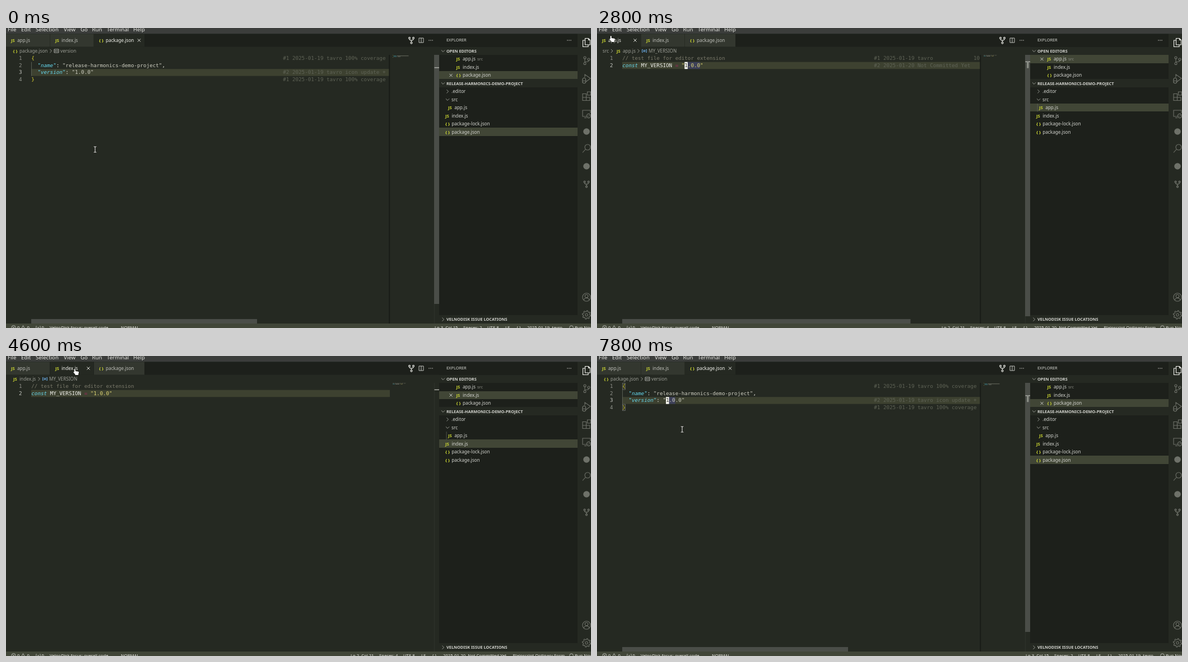
Write an HTML page with a canvas that moves like this. It is 1044 px wide and 536 px high and loops after 8000 ms.

```html
<!DOCTYPE html>
<html lang="en">
<head>
<meta charset="utf-8">
<title>Editor session</title>
<style>
html, body { margin: 0; width: 100%; height: 100%; overflow: hidden; background: #252922; }
canvas { display: block; width: 1044px; height: 536px; }
</style>
</head>
<body>
<canvas id="stage"></canvas>
<script>
const W = 1044, H = 536, LOOP = 8000, STEP = 100;
const canvas = document.getElementById('stage');
const ctx = canvas.getContext('2d');
const dpr = window.devicePixelRatio || 1;
canvas.width = W * dpr;
canvas.height = H * dpr;

const SANS = '"Noto Sans", "Open Sans", sans-serif';
const MONO = '"DejaVu Sans Mono", monospace';
const UI = `8.2px ${SANS}`, SMALL = `7.4px ${SANS}`, HEAD = `bold 7.35px ${SANS}`;
const MENU = `9.6px ${SANS}`, STATUS = `7.7px ${SANS}`, BADGE = `bold 7.6px ${SANS}`;
const CODE = `9.22px ${MONO}`, SLANT = `italic 9.22px ${MONO}`;
const CHAR = 5.55, LEFT = 45.3, TOP = 48.2, LINE = 12.5;

const C = {
  editor: '#252922', side: '#1d201b', tab: '#33372f', row: '#414636', line: '#3d4130',
  text: '#d2d3ce', dim: '#9b9d95', icon: '#6e7169', lime: '#cbd632', white: '#f4f4ef',
  cyan: '#66d9ef', str: '#cfcfc2', gold: '#e0d774', brace: '#e3d92f', note: '#5f6356'
};
const PROJECT = 'release-harmonics-demo-project';
const USER = 'tavro';

// ---------- helpers ----------
function rect(x, y, w, h, color) {
  ctx.fillStyle = color;
  ctx.fillRect(x, y, w, h);
}
function text(str, x, y, color = C.text, font = UI, align = 'left') {
  ctx.font = font;
  ctx.fillStyle = color;
  ctx.textAlign = align;
  ctx.fillText(str, x, y);
}
// Labels are placed by their vertical middle.
const label = (str, x, mid, color, font) => text(str, x, mid + 2.9, color, font);

function icon(d, x, y, color = C.text, width = 0.9) {
  ctx.save();
  ctx.translate(x, y);
  ctx.strokeStyle = color;
  ctx.lineWidth = width;
  ctx.stroke(new Path2D(d));
  ctx.restore();
}
function dot(x, y, r, color) {
  ctx.fillStyle = color;
  ctx.beginPath();
  ctx.arc(x, y, r, 0, 7);
  ctx.fill();
}
const more = (x, y) => [-3, 0, 3].forEach(d => dot(x + d, y, 0.75, C.text));
const close = (x, y, color) => icon('M-2.6-2.6L2.6 2.6M2.6-2.6L-2.6 2.6', x, y, color, 0.9);
const right = (x, y) => icon('M-1.6-3.1L1.5 0L-1.6 3.1', x, y, '#b4b6ae', 0.8);
const down = (x, y) => icon('M-3.1-1.5L0 1.6L3.1-1.5', x, y, '#b4b6ae', 0.8);
const badge = (type, x, mid) => text(type === 'js' ? 'JS' : '{ }', x, mid + 2.7, C.lime, BADGE);
const ring = (r, x = 0, y = 0) => `M${x + r} ${y}A${r} ${r} 0 1 1 ${x - r} ${y}A${r} ${r} 0 1 1 ${x + r} ${y}`;
const FORK = ring(1.5, -3.5, -4) + ring(1.5, 3.5, -4) + ring(1.5, 0, 4.5) +
  'M-3.5-2.5Q-3.5 0 0 0Q3.5 0 3.5-2.5M0 0V3';
const SOURCE = ring(2, -3, -5) + ring(2, 4, -2) + ring(2, -3, 5.5) + 'M-3-3V3.5M4 0Q4 2.2 1.5 2.2H0Q-3 2.2-3 3.5';

function gear(r, teeth) {
  let d = '';
  for (let i = 0; i < teeth * 4; i++) {
    const a = (i + 0.5) * Math.PI / (teeth * 2), k = i % 4 < 2 ? r : r * 0.74;
    d += `${i ? 'L' : 'M'}${k * Math.cos(a)} ${k * Math.sin(a)}`;
  }
  return d + 'Z' + ring(r * 0.3);
}

// ---------- timeline ----------
const mouse = [
  [0, 159, 217], [400, 159, 217], [900, 132, 104], [1000, 132, 104], [1300, 102, 54],
  [1400, 107, 60], [1500, 107, 60], [1900, 24, 21], [2000, 24, 21], [2200, 27, 19],
  [3100, 27, 19], [3700, 41, 23], [4000, 44, 24], [4300, 125, 28], [4900, 125, 28],
  [5600, 189, 23], [5900, 189, 23], [6200, 158, 106], [6800, 152, 131], [8000, 152, 131]
];
const caretOn = [[2100, 3200], [3600, 4000], [4800, 5200], [5500, 6400], [6800, 7400], [7800, 8000]];
const clamp = v => Math.max(0, Math.min(1, v));
const within = (t, a, b) => t >= a && t < b;

function mouseAt(t) {
  const i = mouse.findIndex((k, n) => n && t <= k[0]);
  const [t0, x0, y0] = mouse[i - 1], [t1, x1, y1] = mouse[i];
  const p = (t - t0) / (t1 - t0), e = p * p * (3 - 2 * p);
  return [x0 + (x1 - x0) * e, y0 + (y1 - y0) * e];
}
function stateAt(t) {
  const file = t < 2400 ? 'pkg' : t < 4500 ? 'app' : t < 5800 ? 'index' : 'pkg';
  const noted = t < 2400 || within(t, 2800, 4500) || within(t, 5000, 5800) || t >= 6000;
  const fade = start => 1 - clamp((t - start) / 800);
  return {
    file, noted,
    wide: noted && !within(t, 6000, 6300),
    words: noted && t >= 2400,
    brackets: t >= 5900,
    caret: caretOn.some(([a, b]) => within(t, a, b)),
    bars: t < 2400 ? fade(1600) : t < 4500 ? fade(3300) : t < 5800 ? fade(5550) : clamp((t - 6000) / 400),
    tip: within(t, 3800, 4200)
  };
}

// ---------- editor ----------
const tabs = [
  { id: 'app', name: 'app.js', type: 'js', x: 0, w: 78, ix: 9, tx: 20, cx: 68 },
  { id: 'index', name: 'index.js', type: 'js', x: 78.5, w: 78, ix: 88, tx: 99, cx: 147 },
  { id: 'pkg', name: 'package.json', type: 'json', x: 157, w: 90, ix: 166, tx: 178, cx: 237.5 }
];

function drawTop(s, mx, my) {
  rect(0, 0, W, 10.5, '#3b3d3b');
  [['File', 3], ['Edit', 27], ['Selection', 53], ['View', 103], ['Go', 133], ['Run', 153.5],
    ['Terminal', 180], ['Help', 227]].forEach(([m, x]) => text(m, x, 5.6, '#e8e8e4', MENU));
  rect(0, 10.5, 773, 23, C.side);
  for (const t of tabs) {
    const active = t.id === s.file;
    const hover = my < 33 && my > 10 && mx >= t.x && mx < t.x + t.w;
    rect(t.x, 10.5, t.w, 23, active ? C.editor : C.tab);
    badge(t.type, t.ix, 22);
    label(t.name, t.tx, 22, active ? C.white : '#bfc0ba');
    if (active || hover) close(t.cx, 22, active ? C.white : C.text);
  }
  icon(FORK, 723.5, 22, C.text, 1.3);
  icon('M-4-4H4V4H-4ZM0-4V4', 741, 22, C.text);
  more(758, 22);
}

function symbol(x, y) {
  icon('M-2.5-2.5H-4V2.5H-2.5M2.5-2.5H4V2.5H2.5M2 0A2 1.5 0 1 1-2 0A2 1.5 0 1 1 2 0M-1 1L1-1', x, y, '#75beff', 0.8);
}
function drawCrumbs(file) {
  const y = 41;
  if (file === 'pkg') {
    badge('json', 12.5, y);
    label('package.json', 24, y, C.dim);
    right(80, y);
    icon('M-4-3H4V3H-4Z', 90, y, C.text, 0.8);
    icon('M-2.6 0H-.8M0 0H.9M1.6 0H2.7', 90, y, C.text, 1.4);
    label('version', 97, y, C.dim);
    return;
  }
  const app = file === 'app', x = app ? 35 : 13;
  if (app) {
    label('src', 10, y, C.dim);
    right(26.5, y);
  }
  badge('js', x, y);
  label(app ? 'app.js' : 'index.js', x + 11, y, C.dim);
  right(app ? 74 : 59, y);
  symbol(app ? 84.5 : 69.5, y);
  label('MY_VERSION', app ? 92 : 77, y, C.dim);
}

// Each line is a list of [text, colour, font].
const json = [
  [['{', C.brace]],
  [['  '], ['"name"', C.cyan, SLANT], [': ', C.white], [`"${PROJECT}"`, C.str], [',', C.white]],
  [['  '], ['"version"', C.cyan, SLANT], [': ', C.white], ['"1.0.0"', C.str]],
  [['}', C.brace]]
];
const script = [
  [['// test file for editor extension', '#7a796a']],
  [['const', C.cyan, SLANT], [' MY_VERSION ', C.white], ['=', '#96295a'], [' '], ['"1.0.0"', C.gold]]
];
const jsonNotes = [
  `#1 2025-01-19 ${USER} 100% coverage : 1`, '',
  `#2 2025-01-19 ${USER} icon update + re`, `#1 2025-01-19 ${USER} 100% coverage : 1`
];
const scriptNotes = [`#1 2025-01-19 ${USER}             100%`, '#2 2025-01-20 Not Committed Yet'];
const base = i => TOP + LINE * i + 9.2;

function drawCode(s) {
  const pkg = s.file === 'pkg';
  const lines = pkg ? json : script, notes = pkg ? jsonNotes : scriptNotes;
  const cur = pkg ? 2 : 1, col = pkg ? 14 : 20;
  const y = TOP + LINE * cur, cx = LEFT + CHAR * col;

  rect(45, y, 640, LINE, C.line);
  // JSON marks only the number "1.0", scripts the whole literal.
  if (s.words) rect(cx, y, CHAR * (pkg ? 3 : 5), LINE, '#3d4058');
  if (pkg) rect(45.2, TOP + LINE, 0.8, LINE * 2, '#656960');
  if (s.brackets) {
    ctx.strokeStyle = '#85887f';
    ctx.lineWidth = 0.7;
    [0, 3].forEach(i => ctx.strokeRect(45.6, TOP + LINE * i + 0.5, 5, LINE - 1.2));
  }

  ctx.save();
  ctx.beginPath();
  ctx.rect(0, 47, 685, 481);
  ctx.clip();
  lines.forEach((parts, i) => {
    text(String(i + 1), 28.5, base(i), i === cur ? '#c5c6c0' : '#8f918a', CODE, 'right');
    let c = 0;
    for (const [str, color, font] of parts) {
      text(str, LEFT + c * CHAR, base(i), color, font || CODE);
      c += str.length;
    }
    if (s.noted) text(notes[i], 494.3, base(i), C.note, CODE);
  });
  ctx.restore();

  if (s.caret) {
    rect(cx, y, CHAR, LINE, '#f8f8f0');
    text('1', cx, base(cur), '#34372f', CODE);
  }
}

function drawBars(s) {
  const pkg = s.file === 'pkg';
  rect(764, 48, 0.7, 480, '#343830');
  if (s.wide) rect(683.3, 48, 1.9, 480, '#191c17');

  // minimap
  if (pkg) {
    rect(690, 48.3, 1, 0.8, '#77762f');
    rect(691.5, 49.4, 5, 0.8, '#3f7f86');
    rect(697.5, 49.4, 21, 0.8, '#777b70');
    rect(691.5, 50.7, 6, 0.8, '#3f7f86');
    rect(699, 50.7, 5, 0.8, '#777b70');
    rect(690, 52, 1, 0.8, '#77762f');
  } else {
    for (let x = 690; x < 711; x += 4) rect(x, 48.4, 3.2, 0.8, '#5a5c50');
    rect(690, 49.7, 4, 0.8, '#3f7f86');
    rect(695, 49.7, 7, 0.8, '#8b8d84');
    rect(704, 49.7, 4, 0.8, '#827d4c');
  }

  if (s.noted) {
    ctx.globalAlpha = s.bars;
    rect(764, 48, 9, pkg ? 445 : 467, '#4a4d48');
    if (s.wide) rect(45, 520, pkg ? 403 : 514.5, 8, '#4a4d48');
    ctx.globalAlpha = 1;
  }
  const y = pkg ? 70.2 : 59.7;
  rect(764.5, y, 8.5, 1.3, '#b9bab4');
  if (s.words) rect(767.2, y, 3.2, 12, '#8c8f88');
}

// ---------- side bar ----------
function drawSide(file) {
  const rowH = 14.5;
  const band = (mid, color) => {
    const top = Math.round(mid - 7.4);
    rect(773, top, 247, Math.round(mid + 7.1) - top, color);
  };
  const header = (name, mid, arrow) => {
    band(mid, C.editor);
    arrow(780, mid);
    text(name, 786, mid + 2.7, C.text, HEAD);
  };
  rect(773, 10.5, 247, 517.5, C.side);
  text('EXPLORER', 786, 24.4, C.text, SMALL);
  more(1005, 22);
  header('OPEN EDITORS', 41, down);
  tabs.forEach((t, i) => {
    const mid = 55.5 + rowH * i;
    if (t.id === file) {
      band(mid, C.row);
      close(794, mid, C.text);
    }
    badge(t.type, 803.5, mid);
    label(t.name, 815, mid);
    if (t.id === 'app') label('src', 841, mid, '#898b83', SMALL);
  });
  header(PROJECT.toUpperCase(), 98.8, down);
  band({ app: 142.3, index: 156.8, pkg: 185.8 }[file], C.row);
  right(788, 113.3);
  label('.editor', 795, 113.3);
  down(788, 127.8);
  label('src', 795, 127.8);
  if (file !== 'pkg') rect(785.7, 135, 0.7, rowH, '#62665d');
  [['js', 'app.js', 789], ['js', 'index.js', 784], ['json', 'package-lock.json', 784],
    ['json', 'package.json', 784]].forEach(([type, name, x], i) => {
    const mid = 142.3 + rowH * i;
    badge(type, x, mid);
    label(name, x + 11.2, mid);
  });
  header('VELNODISK ISSUE LOCATIONS', 520.7, right);
}

function drawActivity() {
  const x = 1036, c = C.icon;
  const put = (d, y, color = c) => icon(d, x, y, color, 1.1);
  rect(1020, 10.5, 24, 517.5, C.editor);
  put('M-2.5-7.5H3.5L6.5-4.5V4H-2.5ZM-2.5-4H-6.5V7.5H3V4M3.5-7.5V-4.5H6.5', 26, C.white);
  put(SOURCE, 58);
  put('M-3-2V-7L7 0L-1 6M-1.5 4A3 3.5 0 1 1-7 4A3 3.5 0 1 1-1.5 4M-7.5 1L-6 2M-1 1L-2.5 2M-8 4.5H-.5M-7.5 8L-6 6.5M-1 8L-2.5 6.5', 90);
  put('M-7-4H-.5V2.5H6V8H-7ZM-7 2.5H-.5V8M1.5-7.5H7.5V-1.5H1.5Z', 121.5);
  put('M1 5H-7V-6H7V-1M-4 7.5H0M2 4L3.4 5.2M6 4L4.6 2.8' + ring(3.6, 3.9, 4), 153);
  dot(x, 185, 5.8, c);
  put(ring(5, 2, -2.5) + 'M-1.6 1L-7 7', 215.5);
  dot(x, 247, 5.8, c);
  icon(FORK, x, 279, c, 1.3);
  put(ring(7.2) + ring(2.8, 0, -2) + 'M-5 5Q-4 1.5 0 1.5Q4 1.5 5 5', 481);
  put(gear(7.6, 8), 512.5);
}

function drawStatus(file) {
  const y = 537.6, put = (str, x) => text(str, x, y, '#eeeee9', STATUS);
  rect(0, 528, W, 8, '#414638');
  icon(ring(3.6) + 'M-1.4-1.4L1.4 1.4M1.4-1.4L-1.4 1.4', 13.5, 535.2, C.text, 0.8);
  put('0', 20);
  icon('M0-3.5L3.5 3H-3.5Z', 30.5, 535.2, C.text, 0.8);
  put('0', 37.5);
  icon('M-3.3-2.8Q-4.4 0-3 3M3.3-2.8Q4.4 0 3 3M-1.8 4L0-1L1.8 4', 57.5, 535, C.text, 0.8);
  put('0', 63.5);
  put('VelnoDisk focus: overall code', 78);
  put('-- NORMAL --', 198);
  const items = file === 'pkg'
    ? [['Ln 3, Col 15', 765], ['Spaces: 2', 816], ['UTF-8', 859], ['LF', 891], ['{ }', 911],
      [`2025-01-19, ${USER}`, 930]]
    : [['Ln 2, Col 21', 615], ['Spaces: 4', 666], ['UTF-8', 709], ['LF', 741], ['{ }', 760.5],
      ['2025-01-20, Not Committed Yet', 780], ['Plainscript Ordinary Form', 904.5]];
  items.forEach(([str, x]) => put(str, x));
  icon(ring(3.3), 1009, 535.2, C.text, 0.8);
  put('Run Now', 1015);
}

function drawTip() {
  rect(39, 36, 236, 20, '#4a4d43');
  rect(39.7, 36.7, 234.6, 18.6, '#1f221c');
  label(`~/projects/${PROJECT}/src/app.js`, 45, 46);
}

// ---------- pointer ----------
const HAND = new Path2D('M-3.2-4.2Q-2.2-5.6-1.2-4.2V-1L4-.2Q5.2.2 5 1.6L4.2 4V6H-1.6V4.6L-4.6 1.4Q-5-.2-3.2.4Z');
const BEAM = 'M-2.4-5H-.8L0-4.4L.8-5H2.4M0-4.4V4.4M-2.4 5H-.8L0 4.4L.8 5H2.4';

function drawPointer(x, y) {
  if (y >= 48) {
    icon(BEAM, x, y, '#11130f', 2.6);
    icon(BEAM, x, y, '#f2f2ee', 1.1);
    return;
  }
  ctx.save();
  ctx.translate(x, y);
  ctx.strokeStyle = '#15170f';
  ctx.lineWidth = 1.4;
  ctx.stroke(HAND);
  ctx.fillStyle = '#fff';
  ctx.fill(HAND);
  ctx.restore();
}

function draw(t) {
  const s = stateAt(t), [mx, my] = mouseAt(t);
  ctx.setTransform(dpr, 0, 0, dpr, 0, 0);
  rect(0, 0, W, H, C.editor);
  drawTop(s, mx, my);
  drawCrumbs(s.file);
  drawCode(s);
  drawBars(s);
  drawSide(s.file);
  drawActivity();
  drawStatus(s.file);
  if (s.tip) drawTip();
  drawPointer(mx, my);
}

const start = performance.now();
function tick() {
  const t = (performance.now() - start) % LOOP;
  draw(Math.floor(t / STEP) * STEP);
  requestAnimationFrame(tick);
}
tick();
</script>
</body>
</html>
```
